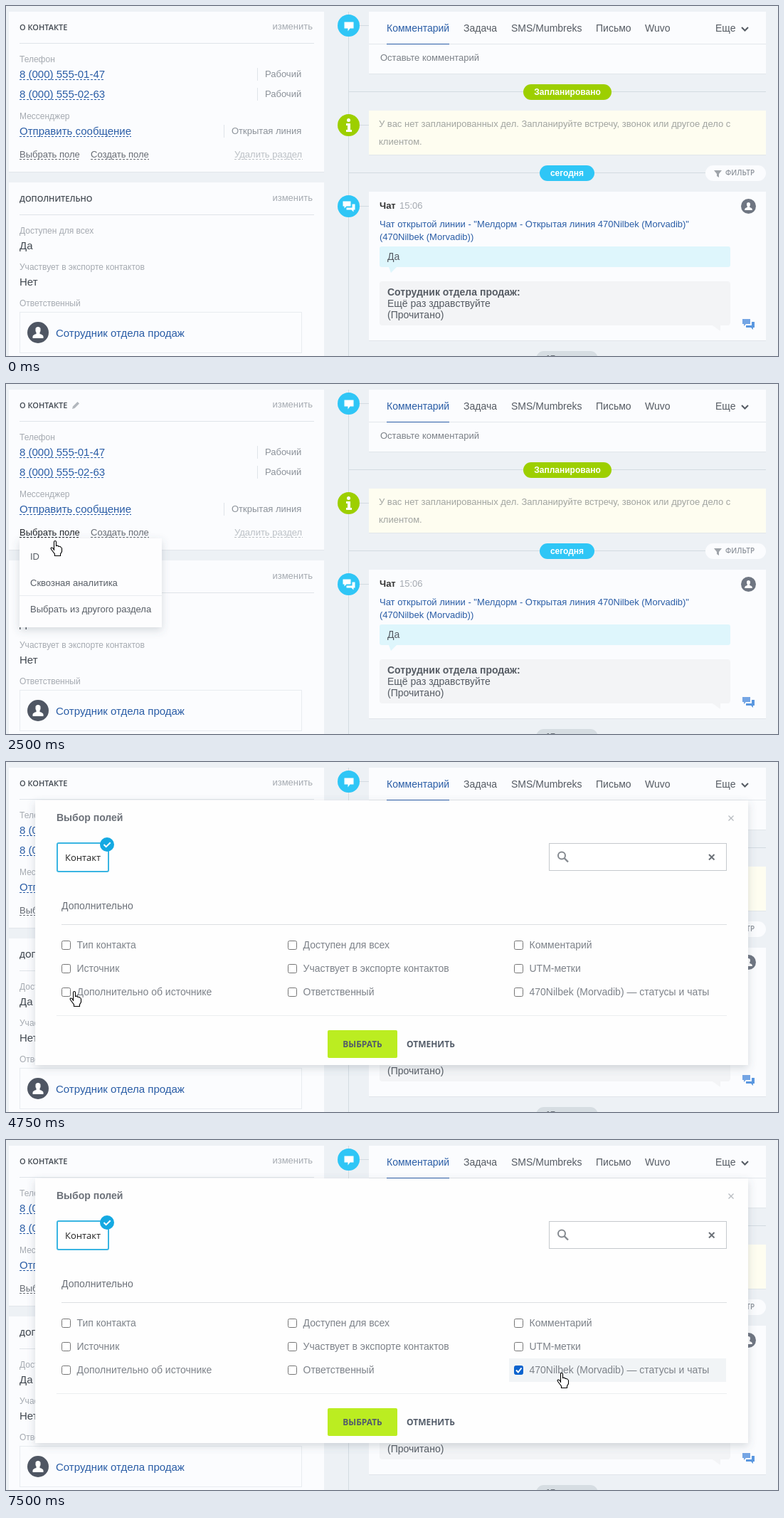
An HTML page for the animation above (8 s loop, 1085x492 px).

```html
<!DOCTYPE html>
<html lang="ru">
<head>
<meta charset="utf-8">
<style>
html, body { margin: 0; width: 100%; height: 100%; overflow: hidden; background: #edf1f5; }
svg { display: block; width: 1085px; height: 492px; font-family: "Liberation Sans", Arial, sans-serif; }
.os { font-family: "Open Sans", sans-serif; }
</style>
</head>
<body>
<svg id="stage" viewBox="0 0 1085 492"></svg>
<script>
const LOOP = 8000;
const BLUE = '#2a5da6', GREY = '#8c929a', PALE = '#a5aab1', DARK = '#414850', MID = '#666b73';
const CYAN = '#2fc6f6', GREEN = '#9dcf00', CARD = '#fbfcfe', RULE = '#dfe4e9', AXIS = '#d3dbe1';

const text = (x, y, s, size = 13, fill = GREY, more = '') =>
  `<text x="${x}" y="${y}" font-size="${size}" fill="${fill}" ${more}>${s}</text>`;
const rect = (x, y, w, h, fill, more = '') =>
  `<rect x="${x}" y="${y}" width="${w}" height="${h}" fill="${fill}" ${more}/>`;
const disc = (x, y, r, fill) => `<circle cx="${x}" cy="${y}" r="${r}" fill="${fill}"/>`;
const path = (d, fill, x = 0, y = 0, more = '') =>
  `<path d="${d}" fill="${fill}" transform="translate(${x} ${y})" ${more}/>`;
const line = (d, color, width = 1, more = '') =>
  `<path d="${d}" fill="none" stroke="${color}" stroke-width="${width}" ${more}/>`;
const bold = 'font-weight="700"';
const heading = 'class="os" font-weight="600"';
const centered = 'text-anchor="middle" ';
const atRight = 'text-anchor="end"';

const card = (x, y, w, h, fill = CARD) =>
  rect(x, y + 1, w, h, '#e1e6ea') + rect(x, y, w, h, fill);
const link = (x, y, w, s, size, fill) =>
  text(x, y, s, size, fill) + line(`M${x} ${y + 2.5}h${w}`, fill, 1, 'stroke-dasharray="3 2"');
const pill = (x, y, w, fill, s) =>
  rect(x, y, w, 22, fill, 'rx="11"') + text(x + w / 2, y + 15, s, 12, '#fff', centered + bold);
const person = (x, y, r, fill) => disc(x, y, r, fill) +
  path('M-7.5 8V5.5Q-7 3-2.5 2V0Q-4-2-3.5-5.5Q-3-8 0-8T3.5-5.5Q4-2 2.5 0V2Q7 3 7.5 5.5V8Z',
    '#fff', x, `${y}) scale(${r / 15}`);
const bubbles = (x, y, front, back) =>
  path('M-8-7h11v7h-6l-3 3v-3h-2z', back, x, y) +
  path('M5-3h4v8h-2v3l-3-3h-7v-3h8z', front, x, y);
const pencil = (x, y) => path('M-5 5l1-3.5L2.5-5 5-2.5-1.5 4z', '#b2b7bd', x, y);

function contactCard(s) {
  const linkFill = s.linkOn ? '#22262b' : MID;
  const side = (x, y, label) => line(`M${x + .5} ${y - 13}v18`, RULE) + text(x + 11, y, label);
  return card(4, 8, 443, 225) +
    text(19, 34, 'О КОНТАКТЕ', 11, DARK, heading) +
    text(431, 33, 'изменить', 13, PALE, atRight) +
    line('M19 52.5h414', RULE) +
    text(19, 79, 'Телефон', 12, PALE) +
    link(19, 101, 120, '8 (000) 555-01-47', 15, BLUE) + side(353, 100, 'Рабочий') +
    link(19, 129, 120, '8 (000) 555-02-63', 15, BLUE) + side(353, 128, 'Рабочий') +
    text(19, 159, 'Мессенджер', 12, PALE) +
    link(19, 181, 157, 'Отправить сообщение', 15, BLUE) + side(306, 180, 'Открытая линия') +
    link(19, 213, 85, 'Выбрать поле', 13, linkFill) +
    link(119, 213, 82, 'Создать поле', 13, MID) +
    link(321, 213, 96, 'Удалить раздел', 13, '#bbc0c5') +
    (s.pencil === 1 ? pencil(98, 30) : '');
}

function fieldTools(i) {
  const y = 316 + 51 * i;
  let dots = '';
  for (let k = 0; k < 10; k++) dots += rect(9 + k % 2 * 4, y - 7 + (k >> 1) * 3, 2, 1.5, '#c6cbd0');
  return dots +
    `<circle cx="430" cy="${y}" r="3.3" fill="none" stroke="#c1c6cb" stroke-width="2.6"/>` +
    `<circle cx="430" cy="${y}" r="5.2" fill="none" stroke="#c1c6cb" stroke-width="2" stroke-dasharray="2.04"/>`;
}

function extraCard(s) {
  return card(4, 248, 443, 250) +
    text(19, 275, 'ДОПОЛНИТЕЛЬНО', 11, DARK, heading) +
    text(431, 274, 'изменить', 13, PALE, atRight) +
    line('M19 293.5h414', RULE) +
    text(19, 320, 'Доступен для всех', 12, PALE) + text(19, 342, 'Да', 15, DARK) +
    text(19, 371, 'Участвует в экспорте контактов', 12, PALE) + text(19, 393, 'Нет', 15, DARK) +
    text(19, 422, 'Ответственный', 12, PALE) +
    rect(19.5, 430.5, 396, 57, CARD, 'stroke="#e8ecf0"') +
    person(45, 459, 15, '#4f5663') +
    text(70, 465, 'Сотрудник отдела продаж', 15, BLUE) +
    (s.pencil === 2 ? pencil(132, 271) : '') +
    (s.field >= 0 ? fieldTools(s.field) : '');
}

function timeline() {
  const tabs = [[535, 'Комментарий'], [643, 'Задача'], [710, 'SMS/Mumbreks'],
    [829, 'Письмо'], [898, 'Wuvo'], [997, 'Еще']];
  return line('M481.5 8V492M482 27.5h28M482 167.5h28M482 281.5h28M482 120.5h586M482 234.5h586', AXIS) +
    card(510, 8, 558, 87) +
    tabs.map(([x, s], i) => text(x, 36, s, 14, i ? '#555b63' : BLUE)).join('') +
    line('M1034 30l4.5 4.5 4.5-4.5', '#555b63', 2) +
    line('M510 53.5h558', '#e3e7eb') + line('M535 53.5h88', BLUE) +
    text(526, 77, 'Оставьте комментарий', 13, '#7b8087') +
    disc(481.5, 27.5, 15.5, CYAN) + path('M-6.5-5.5h13v9h-5l-3 4v-4h-5z', '#fff', 482, 28) +
    pill(727, 110, 124, GREEN, 'Запланировано') +
    card(510, 147, 558, 62, '#fefdf0') +
    text(524, 170, 'У вас нет запланированных дел. Запланируйте встречу, звонок или другое дело с', 13, '#a1a4a0') +
    text(524, 195, 'клиентом.', 13, '#a1a4a0') +
    disc(481.5, 167.5, 15.5, GREEN) + disc(481.5, 160.5, 2.5, '#fff') +
    path('M478 165h6v9h2v3h-8v-3h2v-6h-2z', '#fff') +
    pill(750, 224, 77, CYAN, 'сегодня') +
    rect(983, 224, 85, 22, CARD, 'rx="11"') +
    path('M995 231h11l-4 5v5l-3-2v-3z', '#9fa4aa') +
    text(1011, 238, 'ФИЛЬТР', 10, GREY, heading) +
    card(510, 261, 558, 209) +
    disc(481.5, 281.5, 15.5, CYAN) + bubbles(481.5, 281.5, '#fff', '#fff') +
    text(525, 285, 'Чат', 13, '#333', bold) + text(553, 285, '15:06', 13, PALE) +
    person(1043.5, 281.5, 10.5, '#6f7682') +
    text(525, 311, 'Чат открытой линии - "Мелдорм - Открытая линия 470Nilbek (Morvadib)"', 13, BLUE) +
    text(525, 329, '(470Nilbek (Morvadib))', 13, BLUE) +
    rect(525, 338, 493, 29, '#def6fc', 'rx="3"') + path('M538 367h11l-8 8z', '#def6fc') +
    text(536, 357, 'Да', 14, '#555b63') +
    rect(525, 387, 493, 62, '#f3f4f6', 'rx="4"') + path('M993 449h11v8z', '#f3f4f6') +
    text(536, 407, 'Сотрудник отдела продаж:', 14, '#555b63', bold) +
    text(536, 423, 'Ещё раз здравствуйте', 14, '#555b63') +
    text(536, 439, '(Прочитано)', 14, '#555b63') +
    bubbles(1043, 447, '#5a97df', '#74a5e4') +
    rect(745, 485, 87, 22, '#d6dde2', 'rx="11"') +
    text(788, 500, '17 января', 12, '#6b727a', centered + bold);
}

function menu(s) {
  const rows = [[224, 'ID'], [261, 'Сквозная аналитика'], [298, 'Выбрать из другого раздела']];
  return rect(19, 217, 200, 125, '#fdfdfe', 'filter="url(#soft)"') +
    rows.map(([y, label], i) =>
      (s.item === i ? rect(19, y, 200, 36, '#f3f4f6') : '') +
      text(34, y + 22.5, label, 13, s.item === i ? DARK : '#585e66')).join('') +
    line('M19 297.5h200', '#e9ecef');
}

function dialog(s) {
  const names = ['Тип контакта', 'Источник', 'Дополнительно об источнике',
    'Доступен для всех', 'Участвует в экспорте контактов', 'Ответственный',
    'Комментарий', 'UTM-метки', '470Nilbek (Morvadib) — статусы и чаты'];
  const option = (label, i) => {
    const x = 78 + 318 * Math.floor(i / 3), y = 251 + 33 * (i % 3);
    const on = s.checked && i === 8, over = s.option === i;
    return (over ? rect(x - 7, y + 56 - 56, 305, 33, '#f1f4f6', `transform="translate(0 -10)"`) : '') +
      rect(x + .5, y + .5, 12, 12, on ? '#0b63ce' : '#fff',
        `rx="2" stroke="${on ? '#0b63ce' : over ? '#444' : '#767676'}"`) +
      (on ? line(`M${x + 3} ${y + 6.5}l2.8 3 4.7-6`, '#fff', 2) : '') +
      text(x + 21.5, y + 11, label, 14, '#7d8289');
  };
  return rect(41, 54, 1002, 372, '#fefefe', 'filter="url(#soft)"') +
    text(71, 83, 'Выбор полей', 14, '#6c7179', bold) +
    line('M1015.5 75.5l7 7m0-7l-7 7', '#b9bdc2', 1.3) +
    rect(72, 114, 72, 40, '#fff', 'rx="2" stroke="#3ab5e2" stroke-width="2"') +
    text(83, 139, 'Контакт', 13, '#222', 'class="os"') +
    disc(142, 116, 10, '#14a9e2') + line('M137.5 116l3.2 3.2 6-6', '#fff', 2) +
    rect(763.5, 114.5, 249, 38, '#fff', 'stroke="#c5c9cd"') +
    `<circle cx="781" cy="131.5" r="5" fill="none" stroke="#858a90" stroke-width="2"/>` +
    line('M784.5 135l5.5 5.5', '#858a90', 2.4) +
    line('M988 130l7.5 7.5m0-7.5l-7.5 7.5', '#6b7077', 2) +
    text(78, 207, 'Дополнительно', 14, '#6c7179') +
    line('M78 228.5h935', '#dcdfe2') +
    names.map(option).join('') +
    line('M71 356.5h942', '#eceef0') +
    rect(452, 377, 98, 39, '#bbed21', 'rx="2"') +
    text(501, 401, 'ВЫБРАТЬ', 12, '#535c69', centered + 'class="os" ' + bold) +
    text(563, 401, 'ОТМЕНИТЬ', 12, '#535c69', 'class="os" ' + bold);
}

const arrow = (x, y) =>
  path('M0 0V19L4 15 8 24 11 22.5 7.5 14H13Z', '#000', x, y, 'stroke="#fff" stroke-width=".8"');
const hand = (x, y) =>
  path('M5.5 14V2q0-1.5 1.5-1.5T8.5 2V7.5q3-1 3.5 1q2.5-.7 3 1q1.5 0 1.5 2v4l-2 3.5v2.5h-8v-2.5L2 13q-1.8-2.5 0-3t3.5 3',
    '#fff', x, y, 'stroke="#000" stroke-width="1.1"');

const DEFS = `<defs><filter id="soft" x="-20%" y="-20%" width="140%" height="140%">
  <feDropShadow dx="0" dy="4" stdDeviation="6" flood-color="#4a5a6a" flood-opacity=".22"/></filter></defs>`;

function scene(s) {
  return DEFS + rect(0, 0, 1085, 492, '#edf1f5') +
    contactCard(s) + extraCard(s) + timeline() +
    (s.menu ? menu(s) : '') + (s.dialog ? dialog(s) : '') +
    (s.arrow ? arrow(...s.arrow) : '') + (s.hand ? hand(...s.hand) : '');
}

// Each step changes only what it names; the rest carries over.
const steps = [
  [0, { field: -1, item: -1, option: -1 }],
  [500, { arrow: [140, 440], pencil: 2, field: 2 }],
  [750, { arrow: [132, 351], field: 1 }],
  [1000, { arrow: [125.5, 312], field: 0 }],
  [1250, { arrow: [129, 264], field: -1 }],
  [1500, { arrow: [100, 233], pencil: 1 }],
  [1750, { arrow: null, hand: [96, 198] }],
  [2000, { hand: [95, 202], linkOn: true }],
  [2250, { hand: [80, 208], menu: true }],
  [2500, { hand: [62, 220] }],
  [3250, { hand: [59, 225] }],
  [3500, { hand: [70, 266], pencil: 0, linkOn: false, item: 0 }],
  [3750, { hand: [82, 307], item: 1 }],
  [4000, { hand: [95, 320], item: 2 }],
  [4250, { hand: [89, 322] }],
  [4750, { menu: false, dialog: true }],
  [5000, { option: 2 }],
  [5750, { hand: [327, 331] }],
  [6000, { hand: [538, 332], option: -1 }],
  [6250, { hand: [681, 337], option: 5 }],
  [6500, { hand: [974, 337], option: -1 }],
  [6750, { hand: [774, 327], option: 8 }],
  [7500, { checked: true }]
];
let carry = {};
const states = steps.map(([at, change]) => (carry = { ...carry, ...change, at }));

const stage = document.getElementById('stage');
const start = performance.now();
let shown;
function draw() {
  const t = (performance.now() - start) % LOOP;
  const state = states.findLast(s => s.at <= t);
  if (state !== shown) stage.innerHTML = scene(shown = state);
  requestAnimationFrame(draw);
}
draw();
</script>
</body>
</html>
```
